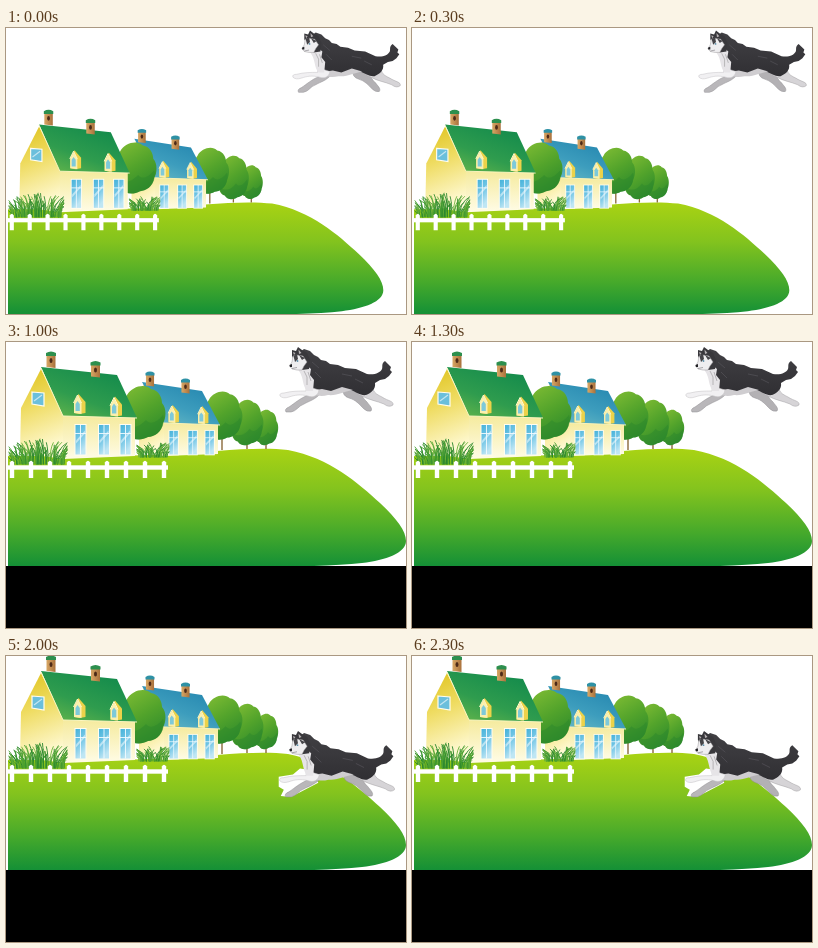
Animation of 400 by 286 pixels, one loop 2500 ms. Source, as an HTML page:

```html
<!DOCTYPE html>
<html lang="en">
<head>
<meta charset="utf-8">
<title>Dog running to the houses</title>
<style>
html, body { margin: 0; width: 100%; height: 100%; overflow: hidden; background: #fff; }
svg { display: block; width: 100vw; height: 100vh; }
</style>
</head>
<body>
<svg viewBox="0 0 400 286" preserveAspectRatio="none">
<defs>
  <linearGradient id="hillFill" x2="0" y2="1">
    <stop offset="0" stop-color="#a9d313"/><stop offset=".35" stop-color="#83c31e"/>
    <stop offset=".72" stop-color="#45a92b"/><stop offset="1" stop-color="#149036"/>
  </linearGradient>
  <linearGradient id="greenRoof" x1="0" y1="1" x2=".7" y2="0">
    <stop offset="0" stop-color="#6cb94a"/><stop offset=".45" stop-color="#2f9c4e"/><stop offset="1" stop-color="#128a4c"/>
  </linearGradient>
  <linearGradient id="blueRoof" x1="0" y1="1" x2=".7" y2="0">
    <stop offset="0" stop-color="#72c0c6"/><stop offset=".5" stop-color="#3d9dbd"/><stop offset="1" stop-color="#2587b0"/>
  </linearGradient>
  <linearGradient id="gable" x2=".2" y2="1">
    <stop offset="0" stop-color="#dfc21c"/><stop offset=".45" stop-color="#efdc62"/><stop offset="1" stop-color="#fffad6"/>
  </linearGradient>
  <linearGradient id="wall" x2="0" y2="1">
    <stop offset="0" stop-color="#f5ea9c"/><stop offset="1" stop-color="#fffce6"/>
  </linearGradient>
  <linearGradient id="glass" x2=".4" y2="1">
    <stop offset="0" stop-color="#45b2da"/><stop offset=".6" stop-color="#7fcbe8"/><stop offset="1" stop-color="#bfe6f4"/>
  </linearGradient>
  <linearGradient id="leaf" x1=".2" x2=".7" y2="1">
    <stop offset="0" stop-color="#7dbb33"/><stop offset=".5" stop-color="#52a32b"/><stop offset="1" stop-color="#2c8a2c"/>
  </linearGradient>
  <linearGradient id="brick" x2="1" y2="0">
    <stop offset="0" stop-color="#d8a765"/><stop offset="1" stop-color="#a9713c"/>
  </linearGradient>
  <linearGradient id="coat" x2="0" y2="1">
    <stop offset="0" stop-color="#414044"/><stop offset="1" stop-color="#302f33"/>
  </linearGradient>

  <g id="tree">
    <path d="M-23 3 C-25 -7 -18 -12 -15 -17 C-10 -26 3 -29 9 -23 C17 -22 20 -14 20 -9 C25 -4 24 7 21 11 C20 20 12 25 6 25 C-1 29 -10 28 -13 23 C-20 22 -23 14 -21 10 C-22 8 -23 6 -23 3 Z" fill="url(#leaf)"/>
    <path d="M-20 14 C-9 18 -2 14 4 8 C9 14 16 9 21 3 C24 12 18 24 6 25 C-1 29 -10 28 -13 23 C-17 22 -20 18 -20 14 Z" fill="#2b852c" opacity=".45"/>
  </g>
  <g id="chimney">
    <path d="M-4.5 3 H4.5 V16 L-4.5 15 Z" fill="url(#brick)"/>
    <path d="M-5 1 Q0 -2 5 1 V4 H-5 Z"/>
    <ellipse cy="8.5" rx="1.5" ry="2.5" fill="#4d2a18"/>
  </g>
  <g id="dormer">
    <path d="M-5.5 -3 L-1 -11 L6 -3 V8 L0 9 L-5.5 8 Z" fill="#ecd24a"/>
    <path d="M-5.5 -2 L-2 -9 L2 -2 V9 L-5.5 8 Z" fill="#fbf0ae"/>
    <path d="M-4 -1 L-2 -4 L.3 -1 V6 H-4 Z" fill="#7ec9d9"/>
    <path d="M-6 -2 L-2 -10 L2 -2" fill="none" stroke="#fff8cf"/>
  </g>
  <g id="pane">
    <path d="M-.5 -.5 H11.5 V31 H-.5 Z" fill="#fffdf0"/>
    <path d="M.5 .5 H10.5 V30 H.5 Z" fill="url(#glass)"/>
    <path d="M1 16 L10 6 V9 L1 19 Z" fill="#fff" opacity=".5"/>
    <path d="M5.5 0 V30 M0 9 H11" stroke="#f2fbff" stroke-width=".9"/>
  </g>

  <g id="dogShape" stroke-linejoin="round">
    <!-- white between the legs -->
    <path d="M291 70 L284 76 L270 78 L270 88 L275 91 L272 97 L282 98 L309 84 L304 72 Z M350 78 L364 80 L379 91 L366 89 L365 97 L359 97 Z" fill="#fff"/>
    <!-- far legs -->
    <path d="M302 75 L312 79 C306 86 300 87 295 90 C289 92 288 97 282 98 H277 Q275 95 280 93 C286 89 290 85 299 81 Z" fill="#b9b7ba" stroke="#8f8d90" stroke-width=".5"/>
    <path d="M334 74 L353 75 C352 82 354 84 358 88 C360 91 364 94 362 97 Q358 98 355 95 C350 90 347 86 340 84 Q333 82 334 74 Z" fill="#b3b1b4" stroke="#8f8d90" stroke-width=".5"/>
    <!-- near hind leg -->
    <path d="M343 72 L364 70 C363 78 367 80 373 83 C379 87 385 87 384 91 Q380 94 375 90 C368 87 360 86 353 82 Q346 80 343 72 Z" fill="#d6d4d7" stroke="#a19fa2" stroke-width=".5"/>
    <!-- tail and trunk -->
    <path d="M291 38 L295 35 L301 37 L305 41 L309 43 L312 46 L317 47 L321 50 L329 51 L336 54 L347 55 L358 60 C366 61 371 59 373 55 C374 52 372 50 376 47 L379 50 L382 53 L381 56 L383 58 L380 62 L376 65 L371 66 L366 69 C367 75 362 79 357 81 C352 82 347 78 342 76 C334 75 328 79 319 80 C312 81 306 80 301 77 C297 70 297 62 295 54 Z" fill="url(#coat)"/>
    <!-- belly -->
    <path d="M300 74 L306 76 L313 75 L322 77 L333 73 L344 76 C336 77 328 82 319 81 C311 83 304 82 300 74 Z" fill="#cfcdd0"/>
    <!-- near foreleg -->
    <path d="M297 72 L310 76 C309 82 304 84 299 82 C291 80 286 81 280 83 Q274 85 271 82 Q270 79 275 79 C283 77 289 77 297 77 Z" fill="#f1f0f2" stroke="#c2c0c3" stroke-width=".5"/>
    <!-- chest -->
    <path d="M288 54 L296 50 L302 55 L301 61 L305 66 L304 77 L298 77 C293 71 295 64 290 57 Z" fill="#e6e4e7"/>
    <path d="M295 57 L298 63 L298 71 M299 58 L302 67" stroke="#aaa8ab" stroke-width=".8" fill="none"/>
    <!-- head -->
    <path d="M283 42 L283 36 L287 37 L289 33 L293 36 L298 39 L301 46 L300 55 L293 56 L288 52 Z" fill="#39383c"/>
    <path d="M284 42 L288 41 L294 42 L298 48 L295 52 L293 56 L288 56 L283 55 L280.5 52 L283 48 Z" fill="#efeef0" stroke="#99979a" stroke-width=".5"/>
    <path d="M284.5 42 L288 40 L289 45 L286 48 Z M290 41 L296 44 L293 46 Z" fill="#454448"/>
    <path d="M284 38 L286.5 39 L285 41 Z M289.5 35.5 L292.5 39 L290 40 Z" fill="#b7b2b4"/>
    <path d="M280.5 51 L283 50 V53 L281 53 Z" fill="#202024"/>
    <circle cx="288.5" cy="47" r=".9" fill="#5d8fa8"/>
    <path d="M283 54.5 L288 53.5" stroke="#77757a" stroke-width=".6"/>
    <!-- fur -->
    <path d="M303 48 L310 54 M306 58 L312 64 M333 60 L343 62 M346 65 L354 69" fill="none" stroke="#55535a" stroke-width=".7"/>
  </g>
</defs>

<rect width="400" height="286" fill="#fff"/>
<g id="scene">
  <path d="M2 104 C70 104 150 105 211 99 C240 96.500 265 96 282 98 C324 106 352 131 374 151 C391 167 400 179 400 189 C400 201 380 208 356 211 Q336 213 308 214 H2 Z" fill="url(#hillFill)"/>

  <g id="grove">
    <path d="M216 84 V98 M241 88 V97 M260 90 V97" stroke="#8a6a3c" stroke-width="1.4"/>
    <use href="#tree" transform="translate(260 75) scale(.52 .66)"/>
    <use href="#tree" transform="translate(241 70) scale(.7 .85)"/>
    <use href="#tree" transform="translate(216 63) scale(.87 .9)"/>
  </g>

  <g id="blueHouse">
    <path d="M133 58 L138 31 L159 71 V104 L133 101 Z" fill="url(#gable)"/>
    <path d="M158 70 H212 V102 L158 104 Z" fill="url(#wall)"/>
    <path d="M136 30 L196 39 L214 73 L158 71 Z" fill="url(#blueRoof)"/>
    <path d="M158 71 L214 73" stroke="#fdf4b8"/>
    <g fill="#2e91a5">
      <use href="#chimney" transform="translate(144 20) scale(.9)"/>
      <use href="#chimney" transform="translate(179.500 27) scale(.9)"/>
    </g>
    <use href="#dormer" transform="translate(167.500 63) scale(.9)"/>
    <use href="#dormer" transform="translate(197 64) scale(.9)"/>
  </g>

  <use href="#tree" transform="translate(136 60)"/>

  <g id="greenHouse">
    <path d="M15 56 L35 17 L58 64 V107 L14 101 Z" fill="url(#gable)"/>
    <path d="M57 63 H129 V104 L57 107 Z" fill="url(#wall)"/>
    <path d="M35 15 L111 23 L131 66 L57 64 Z" fill="url(#greenRoof)"/>
    <path d="M35 16 L57 64 L131 66" fill="none" stroke="#fdf6c0"/>
    <path d="M26 40 L38 41 V54 L26 52 Z" fill="#6bbfdc" stroke="#fffdf0" stroke-width="1.2"/>
    <path d="M28 49 L36 43" stroke="#fff" stroke-width="1.2" opacity=".6"/>
    <g fill="#2d8f4e">
      <use href="#chimney" transform="translate(45 0)"/>
      <use href="#chimney" transform="translate(89.500 9.500)"/>
    </g>
    <use href="#dormer" transform="translate(73.500 53)"/>
    <use href="#dormer" transform="translate(110 55.500)"/>
  </g>

  <g id="panes"></g>
  <g id="grass" fill="none" stroke-linecap="round"></g>
  <g id="fence" fill="#fff"></g>
</g>
<rect id="bar" width="400" height="286"/>
<use id="dog" href="#dogShape"/>
</svg>

<script>
const $ = id => document.getElementById(id);

function add(parent, tag, attrs) {
  const el = document.createElementNS('http://www.w3.org/2000/svg', tag);
  for (const key in attrs) el.setAttribute(key, attrs[key]);
  $(parent).append(el);
}

let seed = 11;
const rand = () => (seed = seed * 16807 % 2147483647) / 2147483647;

// Blades fan out from the middle of the tuft, lower towards its ends.
function tuft(left, right, base, height, count) {
  const mid = (left + right) / 2, half = (right - left) / 2;
  const greens = ['#2a862d', '#4aa032', '#37922f', '#6bb13a'];
  for (let i = 0; i < count; i++) {
    const u = rand() * 2 - 1;
    const x = mid + u * half * .9;
    const h = height * (.35 + .65 * rand()) * (1 - .3 * u * u);
    const tip = Math.max(left, Math.min(right, x + u * 8 + (rand() - .5) * 14));
    add('grass', 'path', {
      d: `M${x} ${base} Q${x} ${base - h * .7} ${tip} ${base - h}`,
      stroke: greens[i % 4], 'stroke-width': .9
    });
  }
}

function panes(xs, y, sx, sy) {
  for (const x of xs)
    add('panes', 'use', { href: '#pane', transform: `translate(${x} ${y}) scale(${sx} ${sy})` });
}

panes([69, 92.5, 114], 72.5, 1, 1);
panes([163, 182, 199], 78.5, .85, .8);
tuft(3, 61, 112, 25, 110);
tuft(131, 163, 105, 15, 60);

add('fence', 'rect', { x: 2, y: 113.3, width: 160, height: 4.4 });
for (let i = 0; i < 9; i++)
  add('fence', 'path', { d: `M${3.8 + i * 19} 126 v-15.500 q2.2 -3.500 4.4 0 v15.500 z` });

const STEP = 500;
// scene: scale x, scale y, ground line; dog: ear x, ear y, scale
const poses = [
  { scene: [.943, .952, 286], dog: [304, 4.5, .95], bar: '#000' },
  { scene: [.972, .973, 257], dog: [300, 5.5, .955], bar: '#1e140c' },
  { scene: [1, 1, 224], dog: [292, 7, 1], bar: '#000' },
  { scene: [1, 1, 214], dog: [289, 35, 1], bar: '#000' },
  { scene: [1, 1, 214], dog: [292, 77, 1.015], bar: '#000' }
];

function draw(ms) {
  const { scene: [sx, sy, ground], dog: [x, y, s], bar } = poses[Math.floor(ms / STEP) % poses.length];
  $('scene').setAttribute('transform', `translate(${2 - 2 * sx} ${ground - 214 * sy}) scale(${sx} ${sy})`);
  $('bar').setAttribute('y', ground);
  $('bar').setAttribute('fill', bar);
  $('dog').setAttribute('transform', `translate(${x} ${y}) scale(${s}) translate(-289 -35)`);
}

const start = performance.now();
function tick() {
  draw(performance.now() - start);
  requestAnimationFrame(tick);
}
tick();
</script>
</body>
</html>
```
